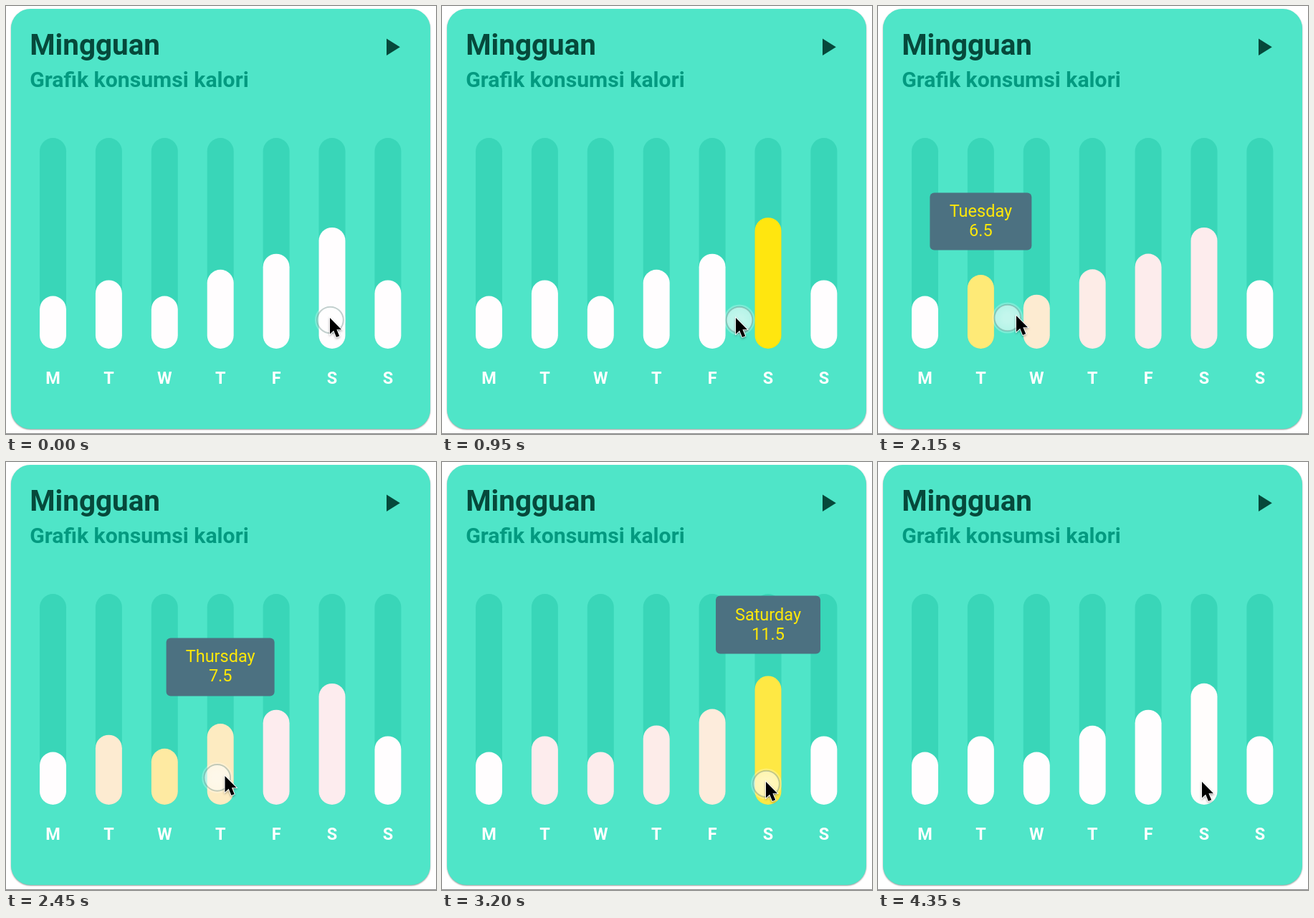
An HTML page for the animation above (4400 ms loop, 600 px wide and 597 px high).

```html
<!DOCTYPE html>
<html lang="id">
<head>
<meta charset="utf-8">
<title>Mingguan</title>
<style>
  html, body { margin: 0; width: 100%; height: 100%; overflow: hidden; background: #fff; }
  #stage { position: relative; width: 600px; height: 597px; overflow: hidden; font-family: Roboto, sans-serif; }
  #card {
    position: absolute; left: 6.5px; top: 3.5px; width: 585.5px; height: 586px;
    border-radius: 27px; background: #4fe5c8; box-shadow: 0 1px 2px rgba(0, 0, 0, .4);
  }
  #edge { position: absolute; left: 0; top: 595.5px; width: 600px; height: 1.5px; background: #858585; }
  svg { position: absolute; left: 0; top: 0; }
  text { font-weight: 700; }
  #tip {
    position: absolute; transform: translate(-50%, -100%); padding: 13.4px 26.9px;
    border-radius: 6px; background: #4c7181; color: #ffe808;
    font-size: 23.5px; line-height: 26.9px; text-align: center; white-space: pre;
  }
</style>
</head>
<body>
<div id="stage">
  <div id="card"></div>
  <div id="edge"></div>
  <svg width="600" height="597">
    <text x="33.2" y="67.5" font-size="40.4" fill="#06493b">Mingguan</text>
    <text x="33.2" y="112.5" font-size="30.2" fill="#039a80">Grafik konsumsi kalori</text>
    <path d="M531 45.5V69L549.8 57.3Z" fill="#06493b"/>
    <g id="bars"></g>
  </svg>
  <div id="tip"></div>
  <svg width="600" height="597">
    <defs>
      <radialGradient id="glow">
        <stop offset=".3" stop-color="#fff" stop-opacity=".66"/>
        <stop offset="1" stop-color="#fff" stop-opacity=".58"/>
      </radialGradient>
      <filter id="soft" x="-50%" y="-50%" width="200%" height="200%">
        <feDropShadow dx="0" dy="1.5" stdDeviation="1.5" flood-opacity=".35"/>
      </filter>
    </defs>
    <g id="touch">
      <circle r="20" fill="none" stroke="#fff" stroke-opacity=".25" stroke-width="3"/>
      <circle r="18.3" fill="url(#glow)" stroke="#70908a" stroke-opacity=".42" stroke-width="2"/>
    </g>
    <path id="arrow" d="M0 0V22.5L5.2 17.8L9 27L13.2 25.2L9.4 16.3H16Z" fill="#000"
      stroke="#fff" stroke-width="1.6" paint-order="stroke" filter="url(#soft)"/>
  </svg>
</div>
<script>
const LOOP = 4400, STEP = 50, TAU = 200, RELEASE = 3900;
const BASE = 478, UNIT = 14.7, WIDTH = 37;
const WHITE = [255, 253, 254], PINK = [253, 236, 238], YELLOW = [255, 230, 0];

// Spans are the [start, end] times of each touch.
const days = [
  { name: 'Monday', value: 5, spans: [] },
  { name: 'Tuesday', value: 6.5, spans: [[2010, 2160]] },
  { name: 'Wednesday', value: 5, spans: [[1690, 1850], [2200, 2340]] },
  { name: 'Thursday', value: 7.5, spans: [[1350, 1540], [2410, 2560]] },
  { name: 'Friday', value: 9, spans: [[1010, 1260], [2630, 2800]] },
  { name: 'Saturday', value: 11.5, spans: [[100, 940], [2950, RELEASE]] },
  { name: 'Sunday', value: 6.5, spans: [] }
];

// Pointer path: time, x, y.
const path = [
  [0, 452, 435], [750, 452, 435], [840, 436, 435], [910, 416, 435], [950, 410, 435],
  [1250, 350, 434], [1570, 268, 431], [1600, 264, 431], [1960, 148, 431], [2050, 150, 431],
  [2110, 176, 432], [2150, 193, 432], [2750, 418, 444], [2850, 440, 446], [2980, 452, 446]
];

const $ = id => document.getElementById(id);
const clamp = v => Math.min(1, Math.max(0, v));
const mix = (a, b, k) => a + (b - a) * k;
const mixColor = (a, b, k) => a.map((v, i) => mix(v, b[i], k));

function add(tag, attrs) {
  const el = document.createElementNS('http://www.w3.org/2000/svg', tag);
  for (const key in attrs) el.setAttribute(key, attrs[key]);
  return $('bars').appendChild(el);
}

days.forEach((day, i) => {
  day.x = 65.5 + i * 77.9;
  const rect = { x: day.x - WIDTH / 2, width: WIDTH, rx: WIDTH / 2 };
  add('rect', { ...rect, y: 184, height: BASE - 184, fill: '#39d6b8' });
  day.bar = add('rect', rect);
  add('text', {
    x: day.x, y: 526.5, 'font-size': 23.5, 'text-anchor': 'middle', fill: '#fff'
  }).textContent = day.name[0];
});

// Exponential rise during a touch and decay after it, from 0 to 1.
function lift(spans, t) {
  let w = 0, last = 0;
  for (const [on, off] of spans) {
    if (t < on) break;
    w *= Math.exp((last - on) / TAU);
    const end = Math.min(t, off);
    w = 1 - (1 - w) * Math.exp((on - end) / TAU);
    last = end;
  }
  return w * Math.exp((last - t) / (last === RELEASE ? 90 : TAU));
}

function pointer(t) {
  const i = path.findIndex(p => p[0] > t);
  if (i < 0) return path[path.length - 1].slice(1);
  if (i === 0) return path[0].slice(1);
  const [a, b] = [path[i - 1], path[i]];
  const k = (t - a[0]) / (b[0] - a[0]);
  return [mix(a[1], b[1], k), mix(a[2], b[2], k)];
}

function draw(t) {
  let active = null;
  for (const day of days) {
    const w = lift(day.spans, t);
    const height = (day.value + w) * UNIT;
    const tint = day.spans.length
      ? clamp((t - day.spans[0][0]) / 150) * clamp((3700 - t) / 300) : 0;
    const color = mixColor(mixColor(WHITE, PINK, tint), YELLOW, w);
    day.bar.setAttribute('y', BASE - height);
    day.bar.setAttribute('height', height);
    day.bar.setAttribute('fill', `rgb(${color.map(Math.round)})`);
    if (day.spans.some(([on, off]) => t >= on && t < off)) active = day;
  }

  const tip = $('tip');
  tip.style.display = active ? 'block' : 'none';
  if (active) {
    tip.textContent = active.name + '\n' + active.value.toFixed(1);
    tip.style.left = active.x - 22 * 0 + 'px';
    tip.style.top = BASE - (active.value + 1) * UNIT - 27 + 'px';
  }

  const [x, y] = pointer(t), [cx, cy] = pointer(t - 30);
  $('arrow').setAttribute('transform', `translate(${x} ${y})`);
  $('touch').setAttribute('transform', `translate(${cx + .5} ${cy + 3})`);
  $('touch').setAttribute('opacity', clamp(1 - (t - RELEASE) / 150));
}

const start = performance.now();
function tick() {
  const t = (performance.now() - start) % LOOP;
  draw(Math.floor(t / STEP) * STEP);
  requestAnimationFrame(tick);
}
tick();
</script>
</body>
</html>
```
